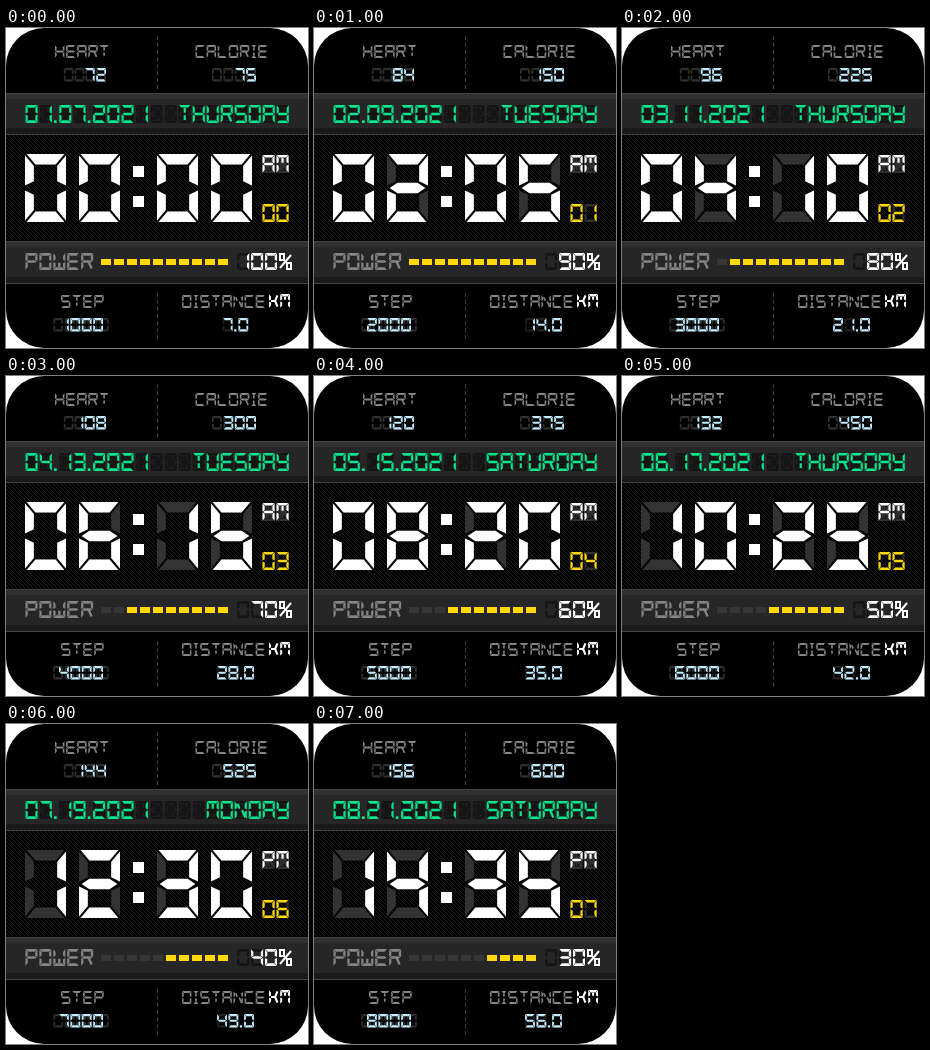
Recreate the animation shown at these times as an HTML page with a canvas. Size 302 px wide and 320 px high, loop 8000 ms.

```html
<!DOCTYPE html>
<html lang="en">
<head>
<meta charset="utf-8">
<title>Digital watch face</title>
<style>
html, body { margin: 0; width: 100%; height: 100%; overflow: hidden; background: #fff; }
canvas { display: block; width: 302px; height: 320px; }
</style>
</head>
<body>
<canvas width="302" height="320" role="img" aria-label="Digital watch face"></canvas>
<script>
const ctx = document.querySelector('canvas').getContext('2d');

// Segments: a-f clockwise ring, g middle, h left half of it,
// i j k upper inner, l m n lower inner.
const GLYPHS = {
  0: 'abcdef', 1: 'bc', 2: 'abged', 3: 'abgcd', 4: 'fgbc', 5: 'afgcd',
  6: 'afgedc', 7: 'abc', 8: 'abcdefg', 9: 'abcdfg', '*': 'abcdefgijklmn',
  A: 'abcefg', C: 'adef', D: 'abcdef', E: 'adefg', H: 'bcefg', I: 'adjm',
  K: 'efhkn', L: 'def', M: 'abcefj', N: 'bcefin', O: 'abcdef', P: 'abefg',
  R: 'abefgn', S: 'afgcd', T: 'ajm', U: 'bcdef', W: 'bcdefm', Y: 'bcdfg'
};

const GREY = '#858585', ICE = '#c4edff', WHITE = '#fff', GOLD = '#ffd80a',
      GREEN = '#08e58a', GHOST = '#303030', BAND_GHOST = '#141414';

const LABEL = { h: 13, pitch: 11.1, w: 9.4, t: 1.9 };
const VALUE = { h: 13.5, pitch: 11.4, w: 9.8, t: 2.2 };
const DATE = { h: 18, pitch: 14.25, w: 12.1, t: 2.7 };
const DAY = { h: 18, pitch: 14, w: 12.1, t: 2.6 };
const POWER = { h: 17, pitch: 13.9, w: 12, t: 2.7 };
const CLOCK = { h: 68, pitch: 54, w: 41, t: 10.5, gap: 1.6 };

function polygon(points) {
  ctx.beginPath();
  for (const [x, y] of points) ctx.lineTo(x, y);
  ctx.fill();
}

function stroke(x1, y1, x2, y2) {
  ctx.beginPath();
  ctx.moveTo(x1, y1);
  ctx.lineTo(x2, y2);
  ctx.stroke();
}

function segment(name, w, h, t, g) {
  const m = h / 2, c = w / 2, q = t / 2, s = t * 0.84;
  const top = [[g, 0], [w - g, 0], [w - s - g, t], [s + g, t]];
  const side = [[0, g], [0, m - 1.6 * g], [s, m - q - g], [s, t + g]];
  const place = (points, flipX, flipY) =>
    polygon(points.map(([x, y]) => [flipX ? w - x : x, flipY ? h - y : y]));
  const near = t + g, far = c - q, tip = s * 0.3;
  switch (name) {
    case 'a': return place(top);
    case 'd': return place(top, false, true);
    case 'f': return place(side);
    case 'b': return place(side, true);
    case 'e': return place(side, false, true);
    case 'c': return place(side, true, true);
    case 'g': return polygon([[tip, m], [s + g, m - q], [w - s - g, m - q],
                              [w - tip, m], [w - s - g, m + q], [s + g, m + q]]);
    case 'h': return stroke(s, m, c + q, m);
    case 'i': return stroke(near, near, far, m - q);
    case 'k': return stroke(w - near / 2, near / 2, w - far, m);
    case 'l': return stroke(near, h - near, far, m + q);
    case 'n': return stroke(w - near / 2, h - near / 2, w - far, m);
    case 'j': return stroke(c, near, c, m - q);
    case 'm': return stroke(c, m + q, c, h - near);
  }
}

const advance = (ch, s) =>
  ch === '.' ? s.pitch * 0.37 : ch === 'I' ? s.pitch * 0.64 : s.pitch;

const measure = (str, s) =>
  [...str].reduce((sum, ch) => sum + advance(ch, s), 0) - (s.pitch - s.w);

function text(str, x, y, s, color) {
  ctx.fillStyle = ctx.strokeStyle = color;
  ctx.lineWidth = s.t * 0.85;
  for (const ch of str) {
    if (ch === '.') {
      ctx.fillRect(x, y + s.h - s.t, s.t, s.t);
    } else {
      const w = ch === 'I' ? s.w * 0.6 : s.w;
      ctx.save();
      ctx.translate(x, y);
      for (const name of GLYPHS[ch]) segment(name, w, s.h, s.t, s.gap || 0.35);
      ctx.restore();
    }
    x += advance(ch, s);
  }
}

const textRight = (str, right, y, s, color) =>
  text(str, right - measure(str, s), y, s, color);

const textCenter = (str, center, y, s, color) =>
  text(str, center - measure(str, s) / 2, y, s, color);

function percent(x, y) {
  ctx.strokeStyle = WHITE;
  ctx.lineWidth = 2;
  ctx.strokeRect(x + 1, y + 1, 4, 6);
  ctx.strokeRect(x + 8, y + 10, 4, 6);
  stroke(x + 12, y + 2, x + 1, y + 15);
}

function band(y, h) {
  const layers = [['#303030', 0, h], ['#262626', 6, h - 6], ['#1a1a1a', h - 7, 7]];
  for (const [color, top, height] of layers) {
    ctx.fillStyle = color;
    ctx.fillRect(0, y + top, 302, height);
  }
  ctx.fillStyle = '#444';
  ctx.fillRect(0, y, 302, 1);
  ctx.fillRect(0, y + h - 1, 302, 1);
}

function backdrop() {
  ctx.fillStyle = '#000';
  ctx.fillRect(0, 0, 302, 320);

  ctx.save();
  ctx.beginPath();
  ctx.rect(0, 107, 302, 106);
  ctx.clip();
  ctx.strokeStyle = '#1a1a1a';
  ctx.lineWidth = 1;
  for (let x = -106; x < 302; x += 4) stroke(x, 107, x + 106, 213);
  ctx.restore();

  band(65, 42);
  band(213, 43);

  ctx.strokeStyle = '#3c3c3c';
  ctx.lineWidth = 1;
  ctx.setLineDash([4, 3]);
  stroke(151.5, 8, 151.5, 61);
  stroke(151.5, 265, 151.5, 312);
  ctx.setLineDash([]);

  text('HEART', 49, 17, LABEL, GREY);
  text('CALORIE', 189.5, 17, LABEL, GREY);
  text('STEP', 55, 267, LABEL, GREY);
  text('DISTANCE', 176, 267, LABEL, GREY);
  text('KM', 263, 266, { h: 14, pitch: 11.2, w: 9.8, t: 2.4 }, WHITE);
  text('POWER', 19.5, 225, POWER, GREY);
}

const pad = n => String(n).padStart(2, '0');

function drawFace(step) {
  const date = new Date(Date.UTC(2021, step, 7 + 2 * step));
  const weekday = date.toLocaleDateString('en-US', { weekday: 'long', timeZone: 'UTC' });
  const hours = 2 * step, power = 100 - 10 * step;

  ctx.clearRect(0, 0, 302, 320);
  ctx.save();
  ctx.beginPath();
  ctx.roundRect(0, 0, 302, 320, 38);
  ctx.clip();
  backdrop();

  textRight('0000', 100, 40, { ...VALUE, pitch: 10.8 }, GHOST);
  textRight(String(72 + 12 * step), 100, 40, VALUE, ICE);
  textRight('0000', 250, 40, VALUE, GHOST);
  textRight(String(75 * (step + 1)), 250, 40, VALUE, ICE);
  textCenter('00000', 75, 290, VALUE, GHOST);
  textCenter(String(1000 * (step + 1)), 75, 290, VALUE, ICE);
  const distance = (7 * (step + 1)).toFixed(1);
  textCenter(distance.replace(/\d/g, '0'), 229.5, 290, VALUE, '#202020');
  textCenter(distance, 229.5, 290, VALUE, ICE);

  text('**.**.****', 19.5, 77, DATE, BAND_GHOST);
  textRight('*'.repeat(10), 282.8, 77, DAY, BAND_GHOST);
  text(`${pad(step + 1)}.${pad(7 + 2 * step)}.2021`, 19.5, 77, DATE, GREEN);
  textRight(weekday.toUpperCase(), 282.8, 77, DAY, GREEN);

  for (const [value, x] of [[hours, 19], [5 * step, 151]]) {
    text('00', x, 126, CLOCK, '#333');
    text(pad(value), x, 126, CLOCK, WHITE);
  }
  ctx.fillStyle = WHITE;
  ctx.fillRect(127, 138, 11, 11);
  ctx.fillRect(127, 168, 11, 11);

  text('**', 256.5, 127, DAY, GHOST);
  text(hours < 12 ? 'AM' : 'PM', 256.5, 127, DAY, WHITE);
  text('00', 256.5, 176, DAY, GHOST);
  text(pad(step), 256.5, 176, DAY, GOLD);

  for (let i = 0; i < 10; i++) {
    ctx.fillStyle = i >= 9 - power / 10 ? GOLD : '#363636';
    ctx.fillRect(95 + 13 * i, 231, 10, 6);
  }
  textRight('000', 271, 225, POWER, BAND_GHOST);
  textRight(String(power), 271, 225, POWER, WHITE);
  percent(273, 225);
  ctx.restore();
}

function frame() {
  drawFace(Math.floor(performance.now() / 1000) % 8);
  requestAnimationFrame(frame);
}
frame();
</script>
</body>
</html>
```
